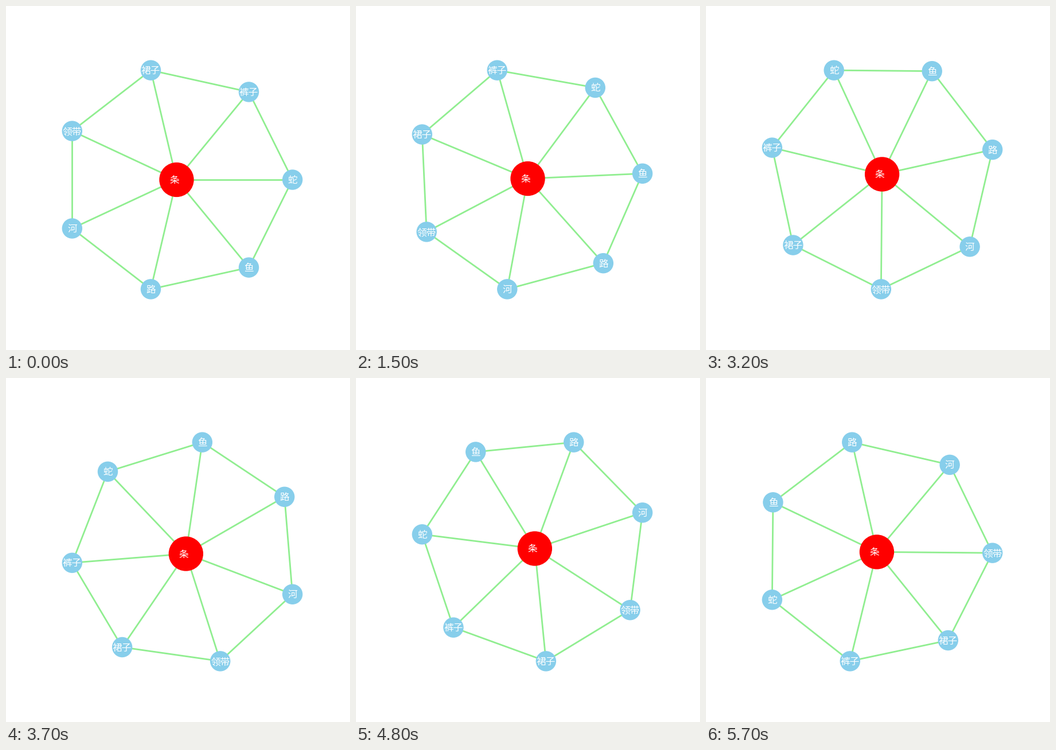
Recreate the animation shown at these times as a matplotlib script. Size 600x600 px, loop 5800 ms.

```python
import numpy as np
import matplotlib.pyplot as plt
from matplotlib.animation import FuncAnimation
from matplotlib.collections import LineCollection

HUB = "条"
RIM = ["蛇", "裤子", "裙子", "领带", "河", "路", "鱼"]
N = len(RIM)
FRAMES, INTERVAL = 58, 100
STEP = np.radians(3.6)      # turn per frame
PAD = 0.105                 # margin around the wheel, as a share of its extent

plt.rcParams["font.family"] = "Noto Sans CJK JP"

fig, ax = plt.subplots(figsize=(6, 6), dpi=100)
ax.axis("off")

spokes = LineCollection([], colors="lightgreen", linewidths=2, zorder=1)
ax.add_collection(spokes, autolim=False)
nodes = ax.scatter(np.zeros(N + 1), np.zeros(N + 1), s=[1800] + [600] * N,
                   c=["red"] + ["skyblue"] * N, linewidths=1, zorder=2)


def label(text, dx=0):
    return ax.annotate(text, (0, 0), xytext=(dx, -1.5), textcoords="offset pixels",
                       color="white", fontsize=12, ha="center", va="center",
                       annotation_clip=False, zorder=3)


# The hub label sits a little left of centre.
labels = [label(HUB, -4.2)] + [label(name) for name in RIM]


def padded(v):
    gap = PAD * np.ptp(v)
    return v.min() - gap, v.max() + gap


def update(i):
    a = 2 * np.pi * np.arange(N) / N + i * STEP
    rim = np.column_stack([np.cos(a), np.sin(a)])
    pos = np.vstack([[0, 0], rim])
    nodes.set_offsets(pos)
    spokes.set_segments([[(0, 0), p] for p in rim]
                        + [[p, q] for p, q in zip(rim, np.roll(rim, -1, axis=0))])
    for text, p in zip(labels, pos):
        text.xy = tuple(p)
    # The view always fits the wheel, so the hub wobbles as it turns.
    ax.set_xlim(*padded(rim[:, 0]))
    ax.set_ylim(*padded(rim[:, 1]))
    return [spokes, nodes, *labels]


anim = FuncAnimation(fig, update, frames=FRAMES, interval=INTERVAL,
                     repeat=True, repeat_delay=0)
plt.show()
```
